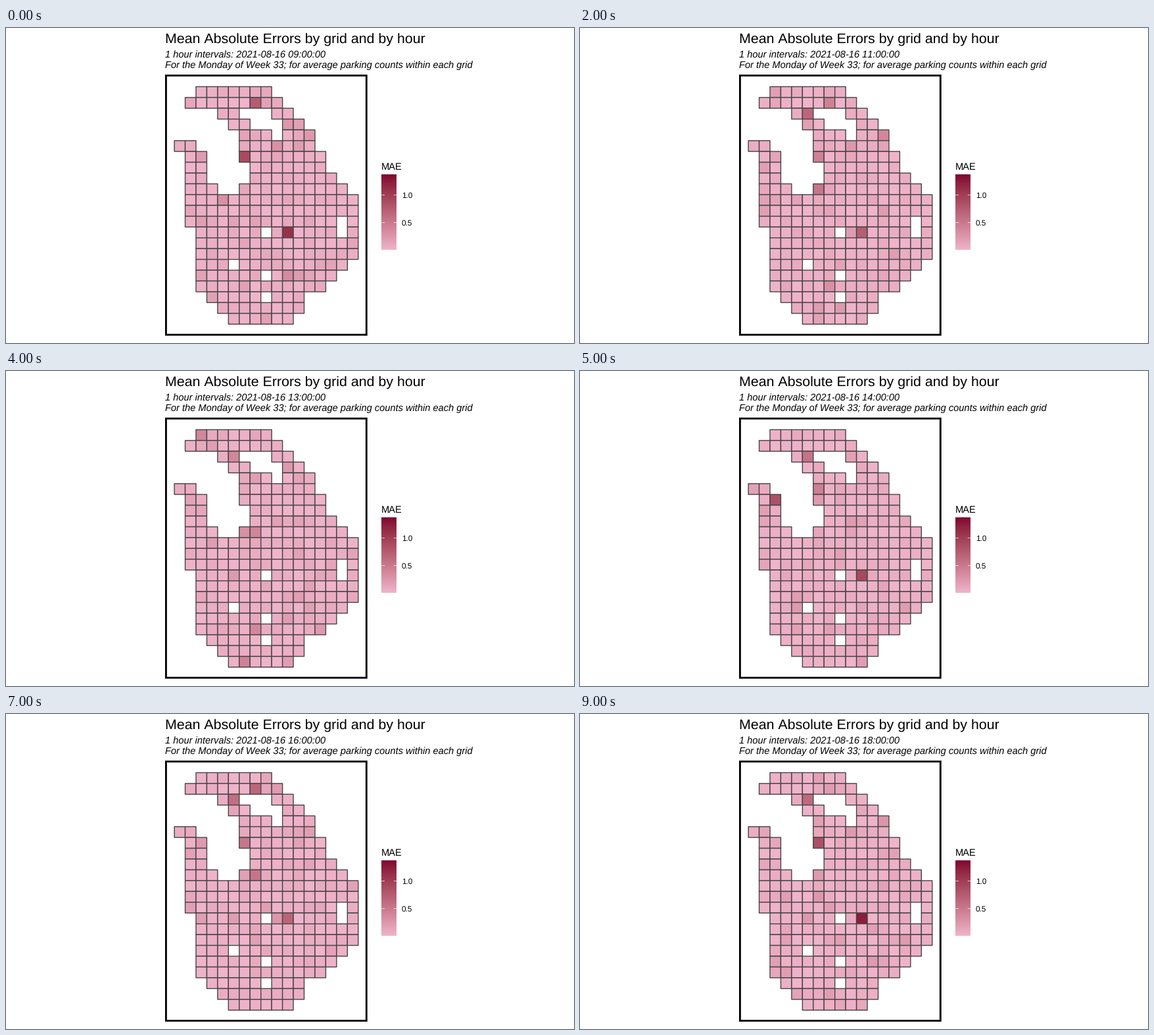
A matplotlib script that plays this animation: 864x480 px, repeating every 10 s.

```python
import numpy as np
import matplotlib.pyplot as plt
from matplotlib.animation import FuncAnimation
from matplotlib.collections import PolyCollection
from matplotlib.patches import Rectangle

plt.rcParams["font.family"] = "Liberation Sans"
plt.rcParams["text.hinting"] = "none"
plt.rcParams["text.kerning_factor"] = 6

W, H, DPI = 864, 480, 96
PX = 72 / DPI
X0, Y0, STEP, ROWS = 256.1, 89.4, 16.45, 22
V_MAX = 1.375
LOW, HIGH = (239, 180, 202), (128, 0, 48)

# Outline of the city: key (row, column) points of both sides, inlets and holes
LEFT = [(0, 2), (1, 1), (2, 4), (4, 6), (5, 0), (6, 1), (12, 1), (13, 2),
        (18, 2), (21, 5)]
RIGHT = [(0, 8), (4, 12), (5, 12.2), (7, 13.3), (10, 16), (15, 16), (18, 13),
         (19, 11.4), (21, 10)]
INLETS = {2: (6, 8), 3: (7, 9), 4: (9, 9), 5: (2, 5), 6: (3, 5), 7: (3, 6),
          8: (3, 6), 9: (4, 5)}
HOLES = {(12, 15), (13, 15), (13, 8), (16, 5), (17, 8), (19, 8)}

# Cells whose error keeps flaring up: level at key hours, linear in between
FLARES = {
    (13, 10): {9: 1.1, 10: 1.37, 12: 0.1, 13: 0.05, 14: 0.92, 16: 0.68,
               18: 1.25},
    (6, 6): {9: 0.9, 10: 0.42, 12: 0.45, 13: 0.06, 14: 0.22, 18: 0.85},
    (2, 5): {9: 0.05, 10: 1.1, 12: 0.23, 14: 0.55, 18: 0.64},
    (1, 7): {9: 0.75, 10: 0.3, 12: 0.56, 13: 0, 14: 0, 16: 0.66, 18: 0.2},
    (9, 6): {9: 0.12, 10: 0.65, 13: 0.3, 14: 0.12, 18: 0.22},
    (9, 7): {10: 0, 13: 0.4, 14: 0, 16: 0.54, 18: 0},
    (18, 7): {9: 0, 10: 0.6, 12: 0, 13: 0.38, 14: 0.17, 18: 0.05},
    (6, 2): {9: 0.2, 13: 0.06, 14: 0.85, 16: 0.22, 18: 0.12},
    (4, 12): {9: 0.23, 12: 0.45, 13: 0.05, 16: 0.05, 18: 0.25},
    (0, 2): {10: 0, 12: 0.35, 13: 0.38, 14: 0},
    (21, 6): {10: 0, 12: 0.32, 13: 0.42, 14: 0},
    (5, 6): {13: 0.1, 14: 0.45, 15: 0.1},
    (5, 9): {9: 0.3, 12: 0.2, 13: 0.05, 16: 0.05, 18: 0.22},
    (10, 4): {9: 0.3, 13: 0},
    (17, 10): {9: 0.35, 10: 0.05, 12: 0.05, 13: 0.2, 14: 0},
}


def side(points, row):
    return round(float(np.interp(row, *zip(*points))))


def inside(row, col):
    first, last = INLETS.get(row, (0, -1))
    return not first <= col <= last and (row, col) not in HOLES


CELLS = [(r, c) for r in range(ROWS)
         for c in range(side(LEFT, r), side(RIGHT, r) + 1) if inside(r, c)]

M_RGB = np.array([[0.4124, 0.3576, 0.1805],
                  [0.2126, 0.7152, 0.0722],
                  [0.0193, 0.1192, 0.9505]])
M_LAB = np.array([[0, 116, 0], [500, -500, 0], [0, 200, -200]])
WHITE = M_RGB.sum(axis=1)


def to_lab(rgb):
    s = np.array(rgb) / 255
    lin = np.where(s > 0.04045, ((s + 0.055) / 1.055) ** 2.4, s / 12.92)
    t = M_RGB @ lin / WHITE
    f = np.where(t > 0.008856, np.cbrt(t), 7.787 * t + 16 / 116)
    return M_LAB @ f - [16, 0, 0]


def to_rgb(lab):
    f = (lab + [16, 0, 0]) @ np.linalg.inv(M_LAB).T
    t = np.where(f > 0.2069, f ** 3, (f - 16 / 116) / 7.787)
    lin = np.clip((t * WHITE) @ np.linalg.inv(M_RGB).T, 0, 1)
    return np.where(lin > 0.0031308, 1.055 * lin ** (1 / 2.4) - 0.055,
                    12.92 * lin)


def shade(values):
    """Blend from LOW to HIGH in Lab space."""
    k = np.clip(np.asarray(values) / V_MAX, 0, 1)[:, None]
    return np.clip(to_rgb(to_lab(LOW) * (1 - k) + to_lab(HIGH) * k), 0, 1)


calm = 0.09 * np.random.default_rng(33).random(len(CELLS)) ** 2


def errors(hour):
    rng = np.random.default_rng(hour)
    vals = calm + 0.18 * rng.random(len(CELLS)) ** 8
    for cell, keys in FLARES.items():
        i = CELLS.index(cell)
        level = np.interp(hour, list(keys), list(keys.values()))
        vals[i] = max(calm[i], level)
    return vals


fig = plt.figure(figsize=(W / DPI, H / DPI), dpi=DPI, facecolor="white")
ax = fig.add_axes([0, 0, 1, 1])
ax.axis("off")


def label(x, y, text, size, **kw):
    return ax.text(x, y, text, fontsize=size, color="black",
                   ha="left", va="baseline", **kw)


def square(r, c):
    x, y = X0 + c * STEP, Y0 + r * STEP
    return [(x, y), (x + STEP, y), (x + STEP, y + STEP), (x, y + STEP)]


label(242, 23, "Mean Absolute Errors by grid and by hour", 16)
clock = label(242, 46, "", 11, style="italic")
label(242, 61, "For the Monday of Week 33; for average parking counts "
      "within each grid", 11, style="italic")

grid = PolyCollection([square(r, c) for r, c in CELLS], edgecolors="#444444",
                      linewidths=1.4 * PX, snap=False)
ax.add_collection(grid, autolim=False)
ax.add_patch(Rectangle((243.4, 72.4), 304.9, 395, fill=False, ec="black",
                       lw=2.85 * PX, joinstyle="miter", snap=False))

# Legend
BAR_X, BAR_W, BAR_TOP, BAR_BOTTOM = 571.4, 23, 223, 338
label(571, 216, "MAE", 11)
ramp = shade(np.linspace(V_MAX, 0, 230))[:, None, :]
ax.imshow(ramp, extent=(BAR_X, BAR_X + BAR_W, BAR_BOTTOM, BAR_TOP),
          aspect="auto", interpolation="bilinear")
for value, y in ((1.0, 254.6), (0.5, 296.4)):
    for x in (BAR_X, BAR_X + BAR_W * 0.8):
        ax.plot([x, x + BAR_W * 0.2], [y, y], color="white", lw=0.7 * PX,
                solid_capstyle="butt", snap=False)
    label(601.8, y + 4.3, f"{value:.1f}", 8.8)
ax.set_xlim(0, W)
ax.set_ylim(H, 0)


def update(i):
    hour = 9 + i
    clock.set_text(f"1 hour intervals: 2021-08-16 {hour:02d}:00:00")
    grid.set_facecolor(shade(errors(hour)))
    return grid, clock


anim = FuncAnimation(fig, update, frames=10, interval=1000, repeat=True,
                     repeat_delay=0, init_func=lambda: update(0))
plt.show()
```
